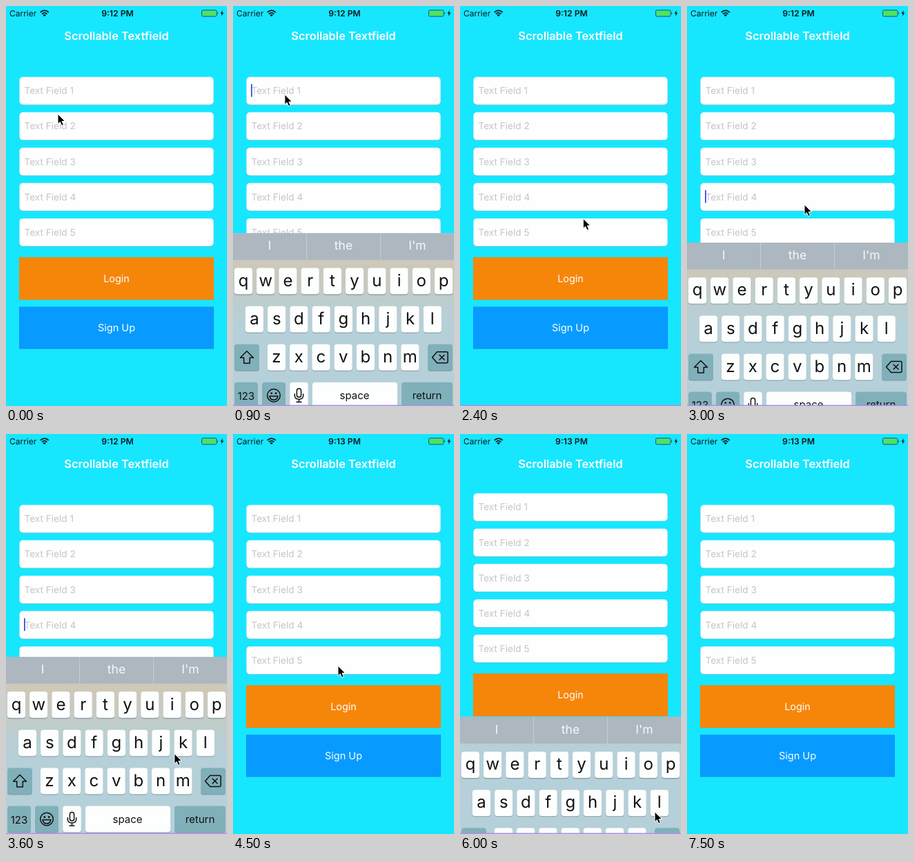
Recreate the animation shown at these times as an HTML page. Size 320 by 578 pixels, loop 7.8 s.

```html
<!DOCTYPE html>
<html lang="en">
<head>
<meta charset="utf-8">
<title>Scrollable Textfield</title>
<style>
html, body { margin: 0; width: 100%; height: 100%; overflow: hidden; background: #17e6ff; }
svg { display: block; width: 100vw; height: 100vh; }
text { font-family: Inter, Roboto, sans-serif; text-rendering: geometricPrecision; }
.mid { text-anchor: middle; }
.line { fill: none; stroke: #111; stroke-width: 1.5; stroke-linejoin: round; stroke-linecap: round; }
</style>
</head>
<body>
<svg id="stage" viewBox="0 0 320 578" xmlns="http://www.w3.org/2000/svg">
  <defs>
    <linearGradient id="glow" gradientUnits="userSpaceOnUse" x1="0" y1="350" x2="0" y2="480">
      <stop offset="0" stop-color="#d2c8b4"/>
      <stop offset=".35" stop-color="#cbc8ba" stop-opacity=".9"/>
      <stop offset="1" stop-color="#b6d0d8" stop-opacity="0"/>
    </linearGradient>
  </defs>
  <rect width="320" height="578" fill="#17e6ff"/>
  <g id="form"></g>
  <text class="mid" x="160" y="49" font-size="16.4" font-weight="600" fill="#fff">Scrollable Textfield</text>
  <g id="status" fill="#0b1a1f">
    <text x="5" y="15" font-size="12">Carrier</text>
    <text id="clock" class="mid" x="161.5" y="15" font-size="12.2" font-weight="600"></text>
    <g fill="none" stroke="#0b1a1f" stroke-width="1.7">
      <path d="M49.6 9.2Q55.7 3.6 61.8 9.2"/>
      <path d="M51.9 11.6Q55.7 8.2 59.5 11.6"/>
    </g>
    <path d="M53.4 12.9Q55.7 11 58 12.9L55.7 15.2Z"/>
    <rect x="283.5" y="6" width="21.5" height="9" rx="1.8" fill="none" stroke="#2a4a50" stroke-width="1"/>
    <rect x="284.6" y="7.1" width="19.3" height="6.8" rx=".8" fill="#4fe35c"/>
    <path d="M306 8.8Q307.8 10.5 306 12.2Z"/>
    <path d="M313.8 6L310.4 11H312.6L311.6 15L315.4 9.7H313Z"/>
  </g>
  <g id="keyboard"></g>
  <rect id="edge" y="576.5" width="320" height="1.5" fill="#b08fe8"/>
  <path id="pointer" d="M0 0V14.6L3.3 11.5L5.6 16.8L8.3 15.6L6 10.5H10.5Z" fill="#000" stroke="#fff" stroke-width="1" stroke-linejoin="round"/>
</svg>
<script>
const LOOP = 7800, STEP = 300, KB_H = 256, SPRING = 14;
const $ = id => document.getElementById(id);

const rect = (x, y, w, h, fill, r = 0, more = "") =>
  `<rect x="${x}" y="${y}" width="${w}" height="${h}" rx="${r}" fill="${fill}" ${more}/>`;
const label = (x, y, size, s, fill = "#111", cls = "mid", weight = 400) =>
  `<text class="${cls}" x="${x}" y="${y}" font-size="${size}" font-weight="${weight}" fill="${fill}">${s}</text>`;
const fieldY = i => 102.5 + i * 51.1;

function buildForm() {
  let s = "";
  for (let i = 0; i < 5; i++) {
    const y = fieldY(i);
    s += rect(19.5, y + .7, 281, 40, "#7fb9c4", 5) + rect(19.5, y, 281, 40, "#fefefe", 5)
      + label(26.5, y + 24.8, 13.6, "Text Field " + (i + 1), "#c5c5ca", "");
  }
  s += rect(19, 363.7, 282, 61.3, "#a9a05a") + rect(19, 363, 282, 61, "#f6860a")
    + label(160, 399, 14.4, "Login", "#fff")
    + rect(19, 434.5, 282, 61, "#1a8fea") + rect(19.5, 435, 281, 59.7, "#079bff")
    + label(160, 470, 14.5, "Sign Up", "#fff");
  $("form").innerHTML = s + rect(26, 0, 1.8, 18.5, "#3b4ee6", .5, 'id="caret"');
}

function key(x, y, w, fill = "#fdfefe", id = "") {
  return rect(x, y + 1.1, w, 38, "#82979f", 4) + rect(x, y, w, 38, fill, 4, id && `id="${id}"`);
}

function buildKeyboard() {
  const dark = "#80b0ba";
  let s = rect(0, 322, 320, 256, "#b5d0d9") + rect(0, 361, 320, 217, "url(#glow)")
    + rect(0, 322, 320, 39, "#adb7bf");
  for (const x of [106.2, 213.2]) s += rect(x, 322, .9, 39, "#c9d1d6");
  s += rect(0, 360.5, 320, .8, "#bfc8cc");
  ["I", "the", "I'm"].forEach((w, i) => s += label(53 + i * 107, 346, 17.5, w, "#f5f8fa"));

  [["qwertyuiop", 15, 372.3], ["asdfghjkl", 31, 427.5], ["zxcvbnm", 63, 482.5]].forEach(([row, x0, y]) => {
    [...row].forEach((c, i) => {
      const x = x0 + i * 32.22;
      s += key(x - 13.1, y, 26.2) + label(x, y + 26.2, 24, c);
    });
  });

  s += key(2, 482.5, 36, dark) + key(282, 482.5, 36, dark);
  s += `<path class="line" d="M20 492.5L29.5 502H24.3V510H15.7V502H10.5Z"/>
    <path class="line" d="M288.5 501.5L295.5 493.5H309Q311 493.5 311 495.5V507.5Q311 509.5 309 509.5H295.5ZM299 498L306 505M306 498L299 505"/>`;

  const y = 537.5;
  s += key(2, y, 34, dark) + label(19, y + 25, 15, "123")
    + key(42, y, 34, dark) + key(82.2, y, 26.6) + key(115, y, 123)
    + label(176, y + 24, 15, "space")
    + key(244, y, 74, dark, "enter") + label(281, y + 24, 15, "return");
  s += `<circle class="line" cx="59" cy="556.5" r="9.3"/>
    <circle cx="55.8" cy="553.5" r="1.4" fill="#111"/><circle cx="62.2" cy="553.5" r="1.4" fill="#111"/>
    <path class="line" d="M53 557.5H65Q64 563 59 563T53 557.5Z"/>
    <rect class="line" x="92.4" y="546.5" width="6.2" height="12.5" rx="3.1"/>
    <path class="line" d="M89.3 554.5V556.5Q89.3 562 95.5 562T101.7 556.5V554.5M95.5 562V566M92 566H99"/>`;
  $("keyboard").innerHTML = s;
}

// One entry per editing session: times, field index, scroll distance
const sessions = [
  { show: 500, hide: 1850, field: 0, scroll: 0 },
  { show: 2700, hide: 3910, field: 3, scroll: 0 },
  { show: 4560, hide: 5914, field: 4, scroll: 25.5 }
];

// Pointer stops: time, x, y
const stops = [
  [0, 75, 156], [450, 72, 125], [950, 75, 128], [1600, 283, 558], [1900, 283, 558],
  [2500, 170, 287], [3300, 170, 287], [3800, 284, 557], [3950, 284, 557], [4450, 152, 335],
  [5150, 152, 335], [5700, 282, 556], [5900, 282, 556], [6000, 282, 546], [6900, 330, 430], [LOOP, 330, 430]
];

function settle(ms) {
  if (ms <= 0) return 0;
  const k = SPRING * ms / 1000;
  const rest = (1 + k) * Math.exp(-k);
  return rest < .003 ? 1 : 1 - rest;
}

function pointerAt(t) {
  const i = stops.findIndex(p => p[0] > t);
  const [t0, x0, y0] = stops[i - 1], [t1, x1, y1] = stops[i];
  const u = (t - t0) / (t1 - t0), e = u * u * (3 - 2 * u);
  return [x0 + (x1 - x0) * e, y0 + (y1 - y0) * e];
}

function draw(t) {
  let up = 0, scroll = 0, focus = -1, pressed = false;
  for (const s of sessions) {
    const p = settle(t - s.show) - settle(t - s.hide);
    if (p > 0) { up = p; scroll = s.scroll * p; }
    if (t >= s.show && t < s.hide) focus = s.field;
    if (t >= s.hide - 60 && t < s.hide) pressed = true;
  }
  // The second session taps return just before its keyboard leaves
  const drop = KB_H * (1 - up);
  $("form").setAttribute("transform", `translate(0 ${-scroll})`);
  $("keyboard").setAttribute("transform", `translate(0 ${drop})`);
  $("glow").setAttribute("gradientTransform", `translate(0 ${-drop - scroll})`);
  $("keyboard").style.display = $("edge").style.display = up > 0 ? "" : "none";
  $("enter").setAttribute("fill", pressed ? "#fdfefe" : "#80b0ba");
  $("caret").style.display = focus < 0 ? "none" : "";
  $("caret").setAttribute("y", fieldY(Math.max(focus, 0)) + 10.3);
  $("clock").textContent = t < 4200 ? "9:12 PM" : "9:13 PM";
  $("pointer").setAttribute("transform", `translate(${pointerAt(t)})`);
}

buildForm();
buildKeyboard();
const start = performance.now();
function tick() {
  const t = (performance.now() - start) % LOOP;
  draw(Math.floor(t / STEP) * STEP);
  requestAnimationFrame(tick);
}
tick();
</script>
</body>
</html>
```
